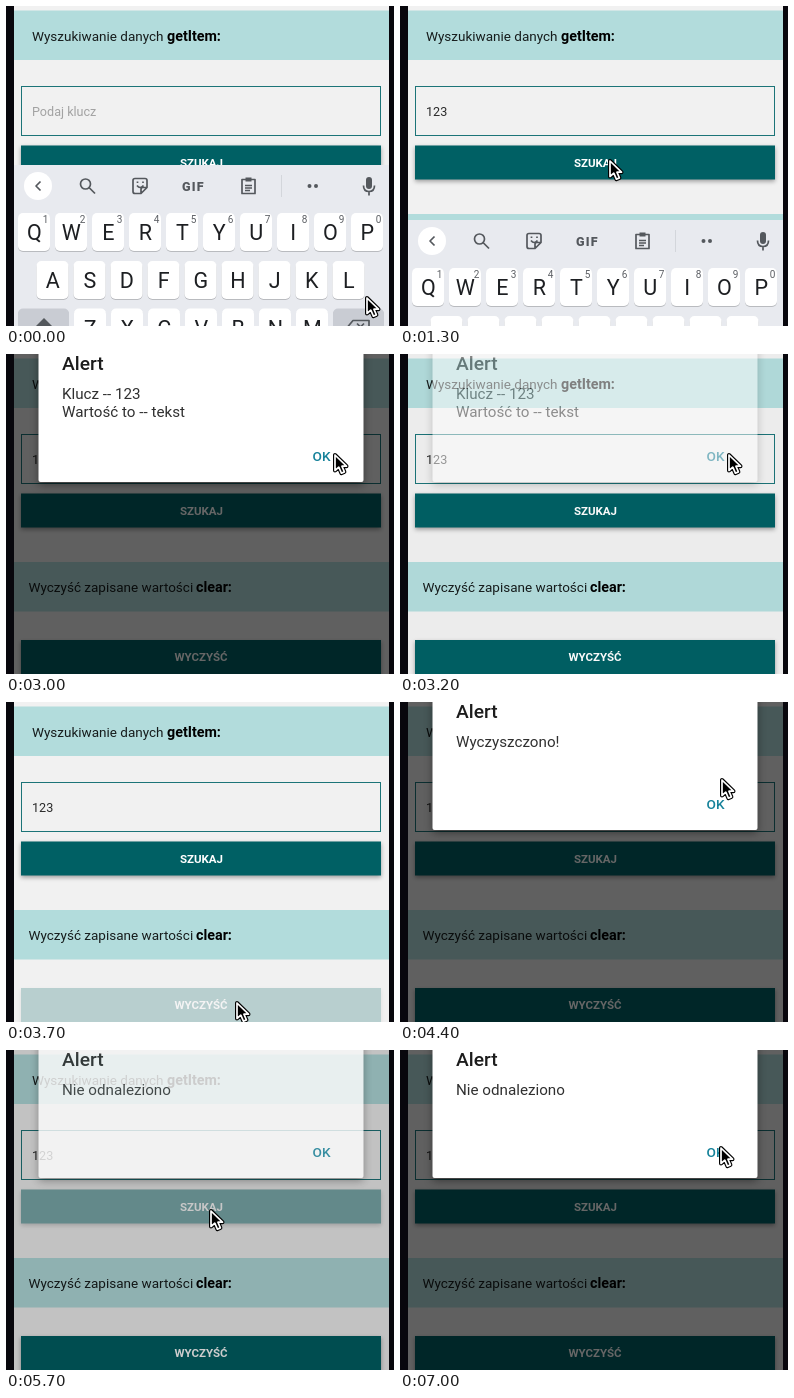
These frames come from a looping animation (388x320 px, 7.2 s). An HTML page:

```html
<!DOCTYPE html>
<html lang="pl">
<head>
<meta charset="utf-8">
<title>Wyszukiwanie danych</title>
<style>
html, body { margin: 0; width: 100%; height: 100%; overflow: hidden; background: #08070d; }
svg { display: block; width: 388px; height: 320px; font-family: Roboto, sans-serif; }
.label { font-size: 13.5px; fill: #161c1c; }
.label tspan { font-size: 14.3px; font-weight: 700; fill: #000; }
.field { font-size: 12.6px; }
.btn rect { fill: #006064; filter: drop-shadow(0 2px 2px rgba(0, 0, 0, .35)); }
.btn text { font-size: 11.5px; font-weight: 700; fill: #fff; text-anchor: middle; }
.key { fill: #fff; filter: drop-shadow(0 1px .5px rgba(0, 0, 0, .2)); }
.mod { fill: #c9ccd3; }
.letter { font-size: 21.5px; fill: #1d1f22; text-anchor: middle; }
.digit { font-size: 10px; fill: #5c5f64; text-anchor: middle; }
.icon { fill: none; stroke: #54585d; stroke-width: 1.7; stroke-linejoin: round; }
.solid { fill: #54585d; }
#alert text { fill: #303030; font-size: 15.2px; }
#alert .title { fill: #1c1c1c; font-size: 19.2px; font-weight: 500; }
#alert .ok { fill: #16829a; font-size: 13.6px; font-weight: 500; }
</style>
</head>
<body>
<svg viewBox="0 0 388 320">
  <rect width="388" height="320" fill="#08070d"/>
  <rect x="8" width="375" height="320" fill="#f1f1f1"/>
  <rect x="8" y="4.5" width="375" height="49.5" fill="#b2dcdc"/>
  <text class="label" x="26" y="34.7">Wyszukiwanie danych <tspan x="161">getItem:</tspan></text>
  <rect x="15.5" y="80.5" width="359" height="49" fill="none" stroke="#1c7478"/>
  <text id="value" class="field" x="26" y="110"></text>
  <g id="search" class="btn">
    <rect x="15" y="139.5" width="360" height="34"/>
    <text x="195.5" y="161">SZUKAJ</text>
  </g>
  <rect x="8" y="208" width="375" height="49.5" fill="#b2dcdc"/>
  <text class="label" x="22.5" y="237.7">Wyczyść zapisane wartości <tspan x="190">clear:</tspan></text>
  <g id="clear" class="btn">
    <rect x="15" y="286" width="360" height="36"/>
    <text x="195" y="307">WYCZYŚĆ</text>
  </g>
  <g id="keyboard">
    <rect x="8" y="159" width="375" height="165" fill="#e8eaef"/>
    <circle cx="32" cy="180" r="14" fill="#fff"/>
    <g class="icon">
      <path d="M34.5 175.500L30 180l4.500 4.500"/>
      <circle cx="79.500" cy="178" r="5"/>
      <path d="M83 181.500l6 6"/>
      <path d="M129 172.500h10q2 0 2 2v7l-6 6h-6q-2 0-2-2v-11q0-2 2-2zM141 181.500h-4q-2 0-2 2v4M131 179.500q3 4 6.500 0M131.500 175.500v1.500M137 175.500v1.500"/>
      <path d="M236 173.500h13v14h-13zM239 179.500h7M239 182h7M239 184.500h5"/>
      <path d="M357.500 179.500q0 6 5.500 6t5.500-6M363 185.500v4"/>
    </g>
    <rect class="solid" x="239.500" y="171.500" width="6" height="4"/>
    <rect class="solid" x="360" y="171" width="6" height="12" rx="3"/>
    <text class="solid" x="176" y="184.500" font-size="12.500" font-weight="900" letter-spacing="1.200">GIF</text>
    <path d="M275.500 169v22" stroke="#d3d6db"/>
    <path d="M303.500 180h13" stroke="#54585d" stroke-width="4" stroke-linecap="round" stroke-dasharray="0 6.500"/>
    <g id="keys"></g>
    <path class="solid" d="M38 312l11 11H27z"/>
    <path class="icon" d="M347 314.500h16v12h-16l-5-6zM351 317.500l7 7M358 317.500l-7 7"/>
  </g>
  <rect id="dim" x="8" width="375" height="320"/>
  <g id="alert">
    <rect x="32.500" y="-20" width="325" height="148" rx="2" fill="#fff" style="filter:drop-shadow(0 3px 4px rgba(0,0,0,.4))"/>
    <text class="title" x="56" y="16">Alert</text>
    <text id="line1" x="56" y="45"></text>
    <text id="line2" x="56" y="63"></text>
    <text class="ok" x="306.500" y="106.700">OK</text>
  </g>
  <g id="cursor" stroke-linejoin="round">
    <path id="arrow" d="M0 0V15.500L3.800 12.200 6.400 18.200 9.400 16.900 6.900 11.200H11.500Z" fill="#000" stroke="#000" stroke-width="4"/>
    <use href="#arrow" style="display:none"/>
    <path d="M0 0V15.500L3.800 12.200 6.400 18.200 9.400 16.900 6.900 11.200H11.500Z" stroke="#fff" stroke-width="1.700"/>
  </g>
</svg>
<script>
const LOOP = 7200, STEP = 100;
const $ = id => document.getElementById(id);
const clamp = v => Math.min(1, Math.max(0, v));
const ramp = (t, from, to) => clamp((t - from) / (to - from));
const ease = p => p * p * (3 - 2 * p);

function addKeys(letters, x, y, digits) {
  return [...letters].map((c, i) => {
    const cx = x + 37 * i;
    const digit = digits ? `<text class="digit" x="${cx + 11.5}" y="217">${(i + 1) % 10}</text>` : '';
    return `<rect class="key" x="${cx - 16}" y="${y}" width="32" height="38" rx="5"/>` +
      `<text class="letter" x="${cx + .3}" y="${y + 27.3}">${c}</text>${digit}`;
  }).join('');
}
$('keys').innerHTML = addKeys('QWERTYUIOP', 28, 207, true) + addKeys('ASDFGHJKL', 46.5, 255) +
  addKeys('ZXCVBNM', 84, 302.5) +
  [12, 327].map(x => `<rect class="key mod" x="${x}" y="302.5" width="51" height="38" rx="5"/>`).join('');

// A press on a button opens its alert; OK closes it.
const alerts = [
  { button: 'search', open: 2100, close: 3100, lines: ['Klucz -- 123', 'Wartość to -- tekst'] },
  { button: 'clear', open: 3700, close: 5000, lines: ['Wyczyszczono!', ''] },
  { button: 'search', open: 5600, close: LOOP, lines: ['Nie odnaleziono', ''] }
];

const home = { x: 361, y: 292 };
const moves = [
  { from: 800, to: 1300, x: 210, y: 155 },
  { from: 2300, to: 2900, x: 329, y: 101 },
  { from: 3200, to: 3600, x: 231, y: 301 },
  { from: 3900, to: 4400, x: 322, y: 78 },
  { from: 4400, to: 4700, x: 318, y: 99 },
  { from: 5000, to: 5400, x: 205, y: 161 },
  { from: 6500, to: 6900, x: 321, y: 98 }
];

function pointer(t) {
  return moves.reduce((p, m) => {
    const k = ease(ramp(t, m.from, m.to));
    return { x: p.x + (m.x - p.x) * k, y: p.y + (m.y - p.y) * k };
  }, home);
}

const pressed = (t, a) => ramp(t, a.open - 200, a.open) * (1 - ramp(t, a.open, a.open + 300));
const shown = (t, a) => ramp(t, a.open, a.open + 125) * (1 - ramp(t, a.close, a.close + 200));

function draw(t) {
  const typed = '123'.slice(0, Math.max(0, Math.floor((t - 100) / 200)));
  $('value').textContent = typed || 'Podaj klucz';
  $('value').setAttribute('fill', typed ? '#2a2a2a' : '#a2a2a2');
  $('keyboard').setAttribute('transform', `translate(0 ${165 * ramp(t, 1200, 1500)})`);

  for (const id of ['search', 'clear']) {
    const press = Math.max(...alerts.filter(a => a.button === id).map(a => pressed(t, a)));
    $(id).setAttribute('opacity', 1 - .77 * press);
  }

  const current = alerts.find(a => t < a.close + 200);
  const level = shown(t, current);
  $('alert').setAttribute('opacity', level);
  $('dim').setAttribute('opacity', .6 * level ** 5);
  [$('line1').textContent, $('line2').textContent] = current.lines;

  const { x, y } = pointer(t);
  $('cursor').setAttribute('transform', `translate(${x} ${y})`);
}

const start = performance.now();
function frame() {
  const t = (performance.now() - start) % LOOP;
  draw(Math.floor(t / STEP) * STEP);
  requestAnimationFrame(frame);
}
frame();
</script>
</body>
</html>
```
